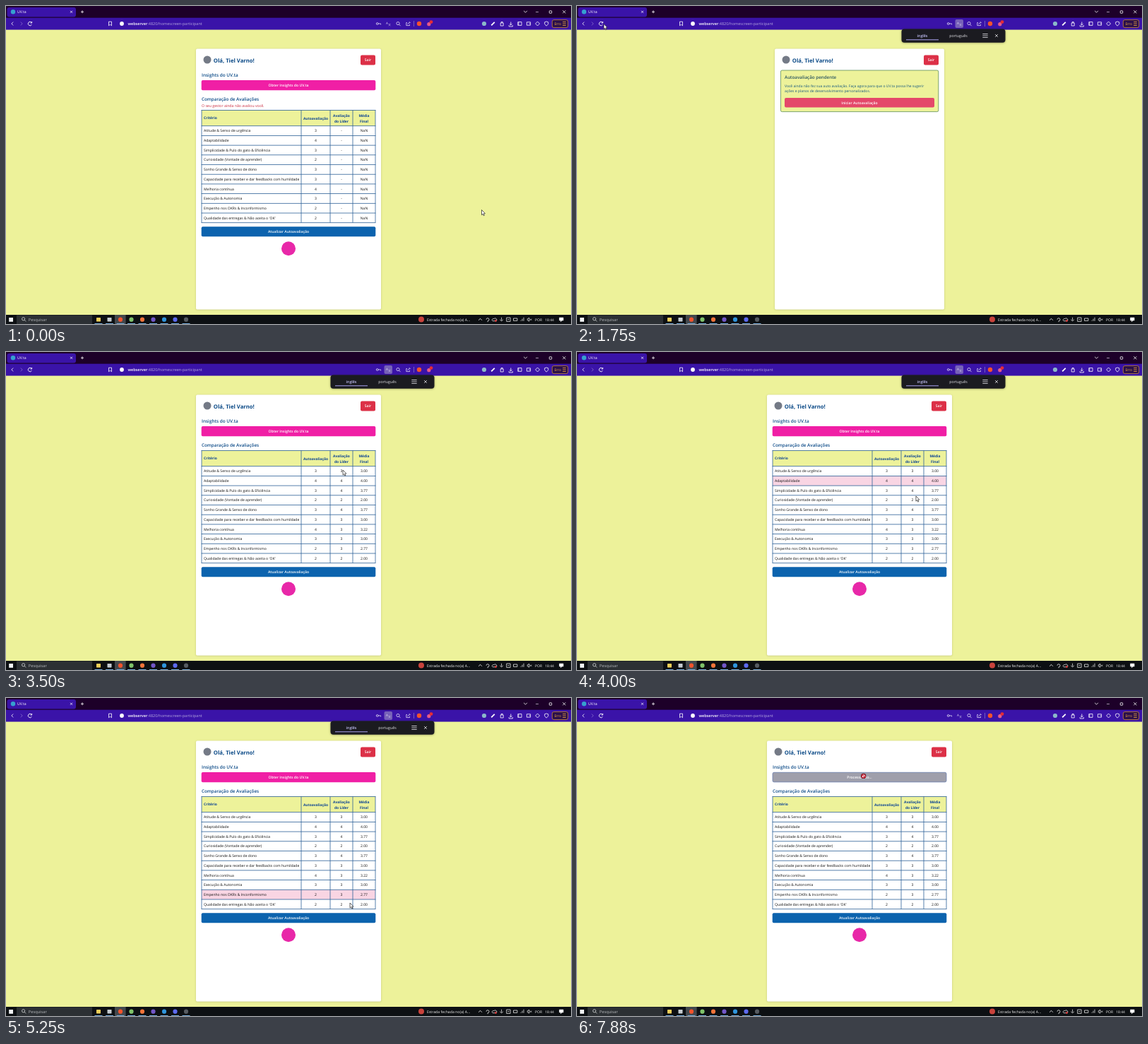
An HTML page with a canvas that plays this animation: 800x450 px, repeating every 8 s.

```html
<!DOCTYPE html>
<html lang="pt">
<head>
<meta charset="utf-8">
<title>Painel</title>
<style>
html, body { margin: 0; width: 100%; height: 100%; overflow: hidden; background: #edf29a; }
canvas { display: block; width: 800px; height: 450px; }
</style>
</head>
<body>
<canvas id="stage"></canvas>
<script>
const canvas = document.getElementById('stage');
const ctx = canvas.getContext('2d');
const ratio = window.devicePixelRatio || 1;
canvas.width = 800 * ratio;
canvas.height = 450 * ratio;

const LOOP = 8000, STEP = 125;
const RELOAD = 1500, LOADED = 2000, CLICK = 7500;
const FONT = '"Open Sans", "Noto Sans", sans-serif';
const LIME = '#edf29a', NAVY = '#0b4a87', PINK = '#f01fa5', RED = '#dc3047';
const PURPLE = '#3a13a8', PALE = '#e4def5';
const APP = 'UV.ta';

const criteria = [
  'Atitude & Senso de urgência',
  'Adaptabilidade',
  'Simplicidade & Pulo do gato & Eficiência',
  'Curiosidade (Vontade de aprender)',
  'Sonho Grande & Senso de dono',
  'Capacidade para receber e dar feedbacks com humildade',
  'Melhoria contínua',
  'Execução & Autonomia',
  'Empenho nos OKRs & Inconformismo',
  "Qualidade das entregas & Não aceita o 'OK'"
];
const ownMarks = '3432334322', leadMarks = '3442433332';
const ROW = 13.7, HEAD = 22.5;

// Places the pointer visits; it eases from one to the next.
const stops = [
  { at: 0, x: 673.5, y: 288.5 },
  { at: 125, x: 293, y: 198, stay: 125 },
  { at: 500, x: 34, y: 24, stay: 1000 },
  { at: 1750, x: 38, y: 25.5, stay: 250 },
  { at: 2750, x: 290, y: 136.5 },
  { at: 3500, x: 477, y: 167 },
  { at: 4625, x: 484, y: 255.5 },
  { at: 5250, x: 487, y: 290, stay: 375 },
  { at: 6125, x: 564, y: 248.5, stay: 250 },
  { at: 6625, x: 530, y: 286 },
  { at: 7125, x: 405, y: 108 }
];

const smooth = k => k * k * (3 - 2 * k);

function pointerAt(t) {
  const next = stops.findIndex(s => s.at > t);
  if (next < 0) return stops[stops.length - 1];
  const a = stops[next - 1], b = stops[next];
  const leave = a.at + (a.stay || 0);
  const k = smooth(Math.max(0, (t - leave) / (b.at - leave)));
  return { x: a.x + (b.x - a.x) * k, y: a.y + (b.y - a.y) * k };
}

function rect(x, y, w, h, color) {
  ctx.fillStyle = color;
  ctx.fillRect(x, y, w, h);
}

function paint(path, fill, stroke, width = 0.8) {
  if (fill) { ctx.fillStyle = fill; ctx.fill(path); }
  if (stroke) { ctx.strokeStyle = stroke; ctx.lineWidth = width; ctx.stroke(path); }
}

function box(x, y, w, h, r, fill, stroke, width) {
  const path = new Path2D();
  path.roundRect(x, y, w, h, r);
  paint(path, fill, stroke, width);
}

function dot(x, y, r, fill, stroke, width) {
  const path = new Path2D();
  path.arc(x, y, r, 0, 7);
  paint(path, fill, stroke, width);
}

// Draws SVG path data with its origin at (x, y).
function glyph(x, y, d, stroke = '#fff', width = 0.8, fill) {
  ctx.save();
  ctx.translate(x, y);
  paint(new Path2D(d), fill, stroke, width);
  ctx.restore();
}

// y is the middle of the capital letters; returns the width.
function text(str, x, y, size, color, weight = 400, align = 'left') {
  ctx.font = `${weight} ${size}px ${FONT}`;
  ctx.textAlign = align;
  ctx.fillStyle = color;
  ctx.fillText(str, x, y + size * 0.357);
  return ctx.measureText(str).width;
}

function cross(x, y, r, color) {
  glyph(x, y, `M${-r} ${-r}L${r} ${r}M${-r} ${r}L${r} ${-r}`, color);
}

function chevron(x, y, angle, color = '#fff') {
  ctx.save();
  ctx.translate(x, y);
  ctx.rotate(angle);
  glyph(0, 0, 'M-2.4 1.2L0 -1.2L2.4 1.2', color);
  ctx.restore();
}

function lens(x, y, color) {
  dot(x, y, 2.1, null, color);
  glyph(x, y, 'M1.5 1.5L3.6 3.6', color);
}

function menu(x, y, w, color) {
  for (const dy of [-2.5, 0, 2.5]) rect(x - w, y + dy - 0.4, 2 * w, 0.8, color);
}

function button(x, y, w, h, label, fill, stroke) {
  box(x, y, w, h, 2, fill, stroke);
  text(label, x + w / 2, y + h / 2, 5.1, '#fff', 600, 'center');
}

function shaded(blur, alpha, drawBox) {
  ctx.save();
  ctx.shadowColor = `rgba(40,45,20,${alpha})`;
  ctx.shadowBlur = blur * ratio;
  ctx.shadowOffsetY = 0.5 * ratio;
  drawBox();
  ctx.restore();
}

function card(w) {
  const x = 400 - w / 2;
  shaded(3, 0.2, () => box(x, 60.5, w, 369, 2, '#fff'));
  dot(x + 16, 76, 5.5, '#747a86');
  text('Olá, Tiel Varno!', x + 24.8, 76.8, 7.7, NAVY, 700);
  button(x + w - 29, 69.5, 21, 14, 'Sair', RED);
}

function table(top, rated, hover) {
  const edges = [277, 418, 459, 491, 523];
  const heads = [['Autoavaliação'], ['Avaliação', 'do Líder'], ['Média', 'Final']];
  const left = edges[0], width = edges[4] - left;
  const first = top + HEAD, height = HEAD + ROW * criteria.length;
  const mid = c => (edges[c + 1] + edges[c + 2]) / 2;

  rect(left, top, width, HEAD, LIME);
  if (hover >= 0) rect(left, first + ROW * hover, width, ROW, '#f9d5e3');

  text('Critério', 280, top + 11.5, 4.95, '#0b4394', 700);
  heads.forEach((lines, c) => lines.forEach((s, i) =>
    text(s, mid(c), top + 11.7 + 7.8 * (i - (lines.length - 1) / 2), 4.95, '#0b4394', 700, 'center')));

  criteria.forEach((name, i) => {
    const y = first + ROW * (i + 0.5);
    const own = +ownMarks[i], lead = +leadMarks[i];
    const mean = Math.floor((own * 200 + lead * 700) / 9) / 100;
    const cells = rated ? [own, lead, mean.toFixed(2)] : [own, '-', 'NaN'];
    text(name, 280, y, 5.05, '#111');
    cells.forEach((v, c) => text(v, mid(c), y, 5.05, '#111', 400, 'center'));
  });

  const ink = '#2f6298', thick = 0.8;
  const across = y => rect(left - thick / 2, y - thick / 2, width + thick, thick, ink);
  across(top + 0.2);
  for (let i = 0; i <= criteria.length; i++) across(first + ROW * i);
  for (const x of edges) rect(x - thick / 2, top, thick, height, ink);
}

function dashboard(rated, hover, busy) {
  const top = rated ? 139.2 : 147.2;
  card(262);
  text('Insights do ' + APP, 277, 98, 6.4, NAVY, 600);
  if (busy) button(277, 105.3, 246, 13.6, 'Processando...', '#9f9fab', '#6d82b2');
  else button(276.7, 105, 246.6, 14.2, 'Obter Insights do ' + APP, PINK);
  text('Comparação de Avaliações', 277, 132, 6.3, NAVY, 600);
  if (!rated) text('O seu gestor ainda não avaliou você.', 277, 141.2, 5.2, '#c9283c');
  table(top, rated, hover);
  button(276.7, top + 165, 246.6, 14, 'Atualizar Autoavaliação', '#0c63ae');
  dot(400, top + 196, 10, '#e828a8');
}

function pending() {
  card(240);
  box(288.4, 91, 223.4, 58.6, 2, LIME, '#5d8f56');
  text('Autoavaliação pendente', 294, 101, 6.25, '#2b5660', 600);
  text(`Você ainda não fez sua auto avaliação. Faça agora para que o ${APP} possa lhe sugerir`,
    294, 112.8, 5.02, '#17597f');
  text('ações e planos de desenvolvimento personalizados.', 294, 120.6, 5.02, '#17597f');
  button(294, 130, 212, 13.5, 'Iniciar Autoavaliação', '#e4486a');
}

function tabBar() {
  rect(0, 0, 800, 18, '#1d0029');
  box(1.5, 2, 97.5, 13.5, 3, PURPLE);
  dot(10, 8.3, 3.2, '#36a0cf');
  text(APP, 16, 8.4, 5.2, '#fff');
  cross(92.5, 8.3, 1.5, '#fff');
  glyph(108, 8.3, 'M-2 0H2M0 -2V2');
  chevron(735.5, 8, Math.PI);
  rect(750, 8, 4, 0.7, '#d8cfe0');
  box(769.3, 6.8, 3.4, 3.4, 0.5, null, '#fff');
  cross(790.3, 8.3, 2, '#fff');
}

function toolbar(popup) {
  const y = 25;
  rect(0, 16.7, 800, 16.9, PURPLE);
  chevron(9, y, -Math.PI / 2);
  chevron(22, y, Math.PI / 2, '#8a72cf');
  glyph(34, y, 'M2.4 1.3A2.7 2.7 0 1 1 2 -1.8M2.6 -3V-1H.6', '#fff', 0.9);
  glyph(147.5, y, 'M-2 -2.8H2V2.8L0 1.2L-2 2.8Z');

  dot(164, y, 2.9, '#fff');
  const host = text('webserver', 172.5, y, 5.5, '#fff', 600);
  text(':4820/homescreen-participant', 172.5 + host, y, 5.5, '#b3a5dd');

  dot(525.7, y, 1.4, null, PALE);
  glyph(527, y, 'M0 0H3.6V1.4', PALE);
  if (popup) box(535.5, 19, 11.5, 12, 2, '#7661b8');
  text('A', 539.5, 24, 4.6, PALE, 400, 'center');
  text('文', 543, 26.3, 3.6, PALE, 400, 'center');
  lens(555, 24.6, PALE);
  glyph(569.5, y, 'M-1.5 -1.5H-2.7V2.6H2V1M-1 1Q0 -1.4 2.8 -1.4L1.4 -2.8', PALE);
  rect(577, 21, 0.7, 8, '#8f7cc9');
  dot(585, y, 3.2, '#f4532c');
  dot(598.8, 25.7, 2.6, '#e65a88');
  dot(602, 22.6, 2.4, '#e62c34');

  const tools = [
    'M-2.4 2.4L2.2 -2.2',
    'M-2 -1H2V3H-2ZM-1 -1V-2.5H1V-1',
    'M0 -2.5V2M-1.8 .3L0 2L1.8 .3M-2.6 2.2V4H2.6V2.2',
    'M-2.6 -2.4H2.6V2.4H-2.6ZM-1.6 -2V2',
    'M-2.6 -2.2H2.6V2.2H-2.6ZM.6 0H2.6',
    'M0 -3L3 0L0 3L-3 0Z',
    'M0 -3L2.5 -2.2V.6L0 3.2L-2.5 .6V-2.2Z'
  ];
  dot(677, y, 3.1, '#8bb9c9');
  tools.forEach((d, i) => glyph(689.6 + 12.6 * i, y, d, '#fff', i ? 0.8 : 1.8));
  box(773.3, 19.6, 22.4, 11, 2.5, '#2b0f4a', '#c78a2e');
  text('Erro', 776.4, y, 4.9, '#f1a73a');
  menu(790.5, y, 2.3, '#f1a73a');
}

function translateBar() {
  shaded(3, 0.45, () => box(459.5, 32.5, 147, 19.2, 4, '#1b1b20'));
  text('inglês', 489, 42, 5.3, '#c3c0f5', 600, 'center');
  text('português', 540, 42, 5.3, '#e4e4e8', 400, 'center');
  rect(466, 47.3, 46, 1, '#a9a2ee');
  menu(578, 42, 3.7, '#e4e4e8');
  cross(594, 42, 1.9, '#e4e4e8');
}

function taskbar() {
  const y = 443.7, gray = '#e6e6e6';
  rect(0, 437, 800, 13, '#0d1013');
  box(4.2, 441, 5.8, 5.8, 0, '#f2f4f5');
  rect(15, 437.5, 107, 12.5, '#2c3034');
  lens(24.6, 442.8, '#d6d8da');
  text('Pesquisar', 31.8, 444, 5.7, '#b5b8bb');

  const apps = ['#f2cf58', '#c5cbd0', '#f4532c', '#7fc36a', '#f2743a', '#7357c8', '#2f95dc', '#5d6af0', '#565b61'];
  rect(154, 437, 15.6, 13, '#43484d');
  apps.forEach((color, i) => {
    const x = 131 + 15.5 * i;
    if (i < 2) box(x - 3, 441, 6, 5.4, 0.6, color);
    else dot(x, y, 3.1, color);
    rect(x - 5.5, 449, 11, 1, '#78aede');
  });

  dot(588, 443.5, 4, '#c9433c');
  text('Estrada fechada no(a) A...', 596, 444, 5.2, '#f2f2f2');
  chevron(671.5, 443.5, 0);
  const tray = [
    'M-2 0A2 2 0 1 1 0 2V3.5',
    'M-2.6 2A1.5 1.5 0 0 1 -1 -1A2 2 0 0 1 2.5 2Z',
    'M0 -3V1M-2 0Q0 4 2 0',
    'M-2.7 -2.7H2.7V2.7H-2.7ZM-1 0H1',
    'M-2.7 -1.7H2.7V1.7H-2.7Z',
    'M-2 2V1M0 2V-1M2 2V-3',
    'M-2.5 -1L0 -2.4V2.4L-2.5 1ZM1.4 -1L3.4 1M1.4 1L3.4 -1'
  ];
  tray.forEach((d, i) => glyph(682 + 9.8 * i, y, d, gray));
  dot(693.4, 445.5, 1.4, '#d93a3a');
  text('POR', 754, 444, 5, '#f2f2f2', 400, 'center');
  text('18:44', 769.5, 444, 4.9, '#f2f2f2', 400, 'center');
  glyph(786.3, 443, 'M-2.8 -2H2.8V2H.8L-.8 3.8V2H-2.8Z', '#fff', 0.5, '#fff');
}

function pointer({ x, y }, kind) {
  if (kind === 'blocked') {
    dot(x + 0.7, y + 2.4, 2.9, '#fff', '#30151c', 1.6);
    dot(x + 0.7, y + 2.4, 2.7, null, '#d8263b', 1.1);
    glyph(x + 0.7, y + 2.4, 'M-1.9 -1.9L1.9 1.9', '#d8263b', 1.1);
  } else if (kind === 'hand') {
    glyph(x, y, 'M-.8 5.4V0H.8V2.8L3.6 3.4V6L2.6 8.2H-1L-3 5Z', '#222', 0.6, '#fff');
  } else {
    glyph(x, y, 'M0 0V7.2L1.6 5.7L2.7 8.2L3.9 7.7L2.8 5.3L4.9 5.1Z', '#222', 0.7, '#fff');
  }
}

const inColumns = p => p.x > 277 && p.x < 523;

function hoverRow(t) {
  const p = pointerAt(t);
  const i = Math.floor((p.y - 139.2 - HEAD) / ROW);
  return inColumns(p) && i >= 0 && i < criteria.length ? i : -1;
}

function draw(ms) {
  const t = Math.floor((ms % LOOP) / STEP) * STEP;
  const rated = t >= LOADED, busy = t >= CLICK;
  const popup = t >= RELOAD && !busy;
  const p = pointerAt(t);
  const onButton = rated && inColumns(p) && p.y > 105 && p.y < 119;

  ctx.setTransform(ratio, 0, 0, ratio, 0, 0);
  ctx.textRendering = 'geometricPrecision';
  rect(0, 0, 800, 450, LIME);
  if (t >= RELOAD && !rated) pending();
  else dashboard(rated, rated ? hoverRow(t - 2 * STEP) : -1, busy);
  tabBar();
  toolbar(popup);
  if (popup) translateBar();
  taskbar();
  pointer(p, busy ? 'blocked' : onButton ? 'hand' : 'arrow');
}

const start = performance.now();
function tick() {
  draw(performance.now() - start);
  requestAnimationFrame(tick);
}
tick();
</script>
</body>
</html>
```
